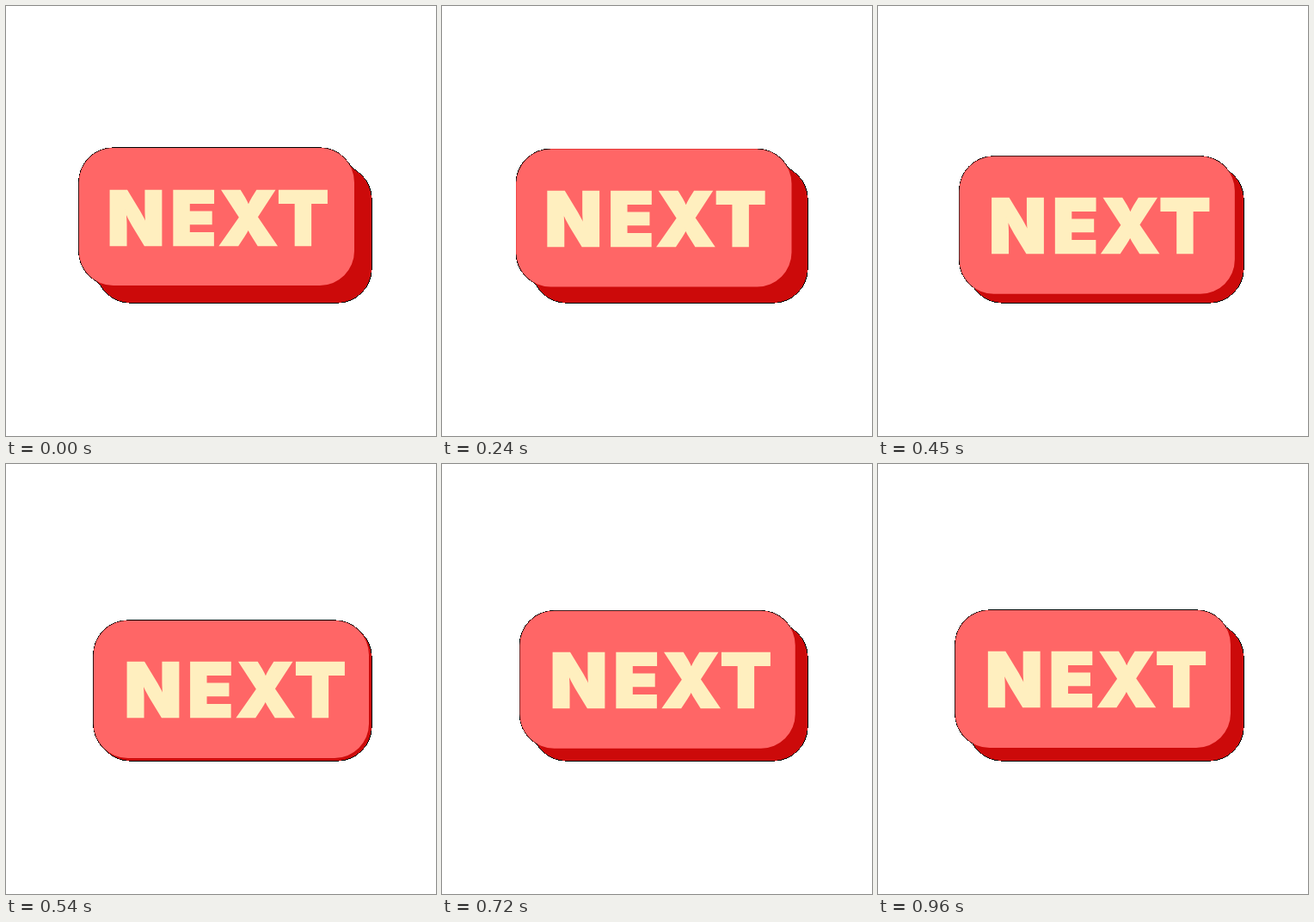
Animation of 500 by 500 pixels, one loop 1050 ms. Source, as an HTML page:

```html
<!DOCTYPE html>
<html lang="en">
<head>
<meta charset="utf-8">
<title>Next button</title>
<style>
  html, body { margin: 0; width: 100%; height: 100%; overflow: hidden; background: #fff; }
  svg { display: block; width: 100%; height: 100%; }
  text {
    font: 900 86.4px Inter, Roboto, sans-serif;
    text-anchor: middle;
    fill: #ffefbf;
    stroke: #ffefbf;
    stroke-width: 2.4;
  }
</style>
</head>
<body>
<svg viewBox="0 0 500 500">
  <path id="side" fill="#cc0a0a" stroke="#000" stroke-width="1.4" paint-order="stroke" shape-rendering="crispEdges"/>
  <path id="face" fill="#ff6666"/>
  <text id="label" x="151 217.9 281.7 345.4" y="278">NEXT</text>
</svg>
<script>
  const LOOP = 1050, STEP = 30;
  const PRESS = 570, REST = 960;
  const DEPTH = 20;
  const X = 84.8, Y = 165, W = 320.2, H = 160, R = 40;

  const [side, face, label] = ['side', 'face', 'label'].map(id => document.getElementById(id));

  function slab(d) {
    const arc = (dx, dy) => `a${R} ${R} 0 0 1 ${dx} ${dy}`;
    return `M${X + d + R} ${Y + d}h${W - 2 * R}${arc(R, R)}v${H - 2 * R}${arc(-R, R)}` +
      `h${2 * R - W}${arc(-R, -R)}v${2 * R - H}${arc(R, -R)}z`;
  }

  // Diagonal band that joins the corners of the front and back slabs.
  function band(d) {
    const k = R * (1 - Math.SQRT1_2) + 1;
    const right = X + W - k, top = Y + k;
    const left = X + k, bottom = Y + H - k;
    return `M${right + d} ${top + d}L${right + DEPTH} ${top + DEPTH}` +
      `L${left + DEPTH} ${bottom + DEPTH}L${left + d} ${bottom + d}z`;
  }

  function pose(t) {
    if (t < PRESS) {
      const d = DEPTH * (t / PRESS) ** 3;
      return { d, tx: d * 1.17, ty: d * 0.95 };
    }
    const left = Math.max(0, (REST - t) / (REST - PRESS));
    const d = 5 + 3.2 * left ** 3;
    return { d, tx: d + 2.3, ty: d - 1 };
  }

  function draw(now) {
    const t = Math.floor((now % LOOP) / STEP) * STEP;
    const { d, tx, ty } = pose(t);
    side.setAttribute('d', slab(d) + slab(DEPTH) + band(d));
    face.setAttribute('d', slab(d));
    label.setAttribute('transform', `translate(${tx} ${ty})`);
  }

  let start;
  function tick(now) {
    start ??= now;
    draw(now - start);
    requestAnimationFrame(tick);
  }
  draw(0);
  requestAnimationFrame(tick);
</script>
</body>
</html>
```
